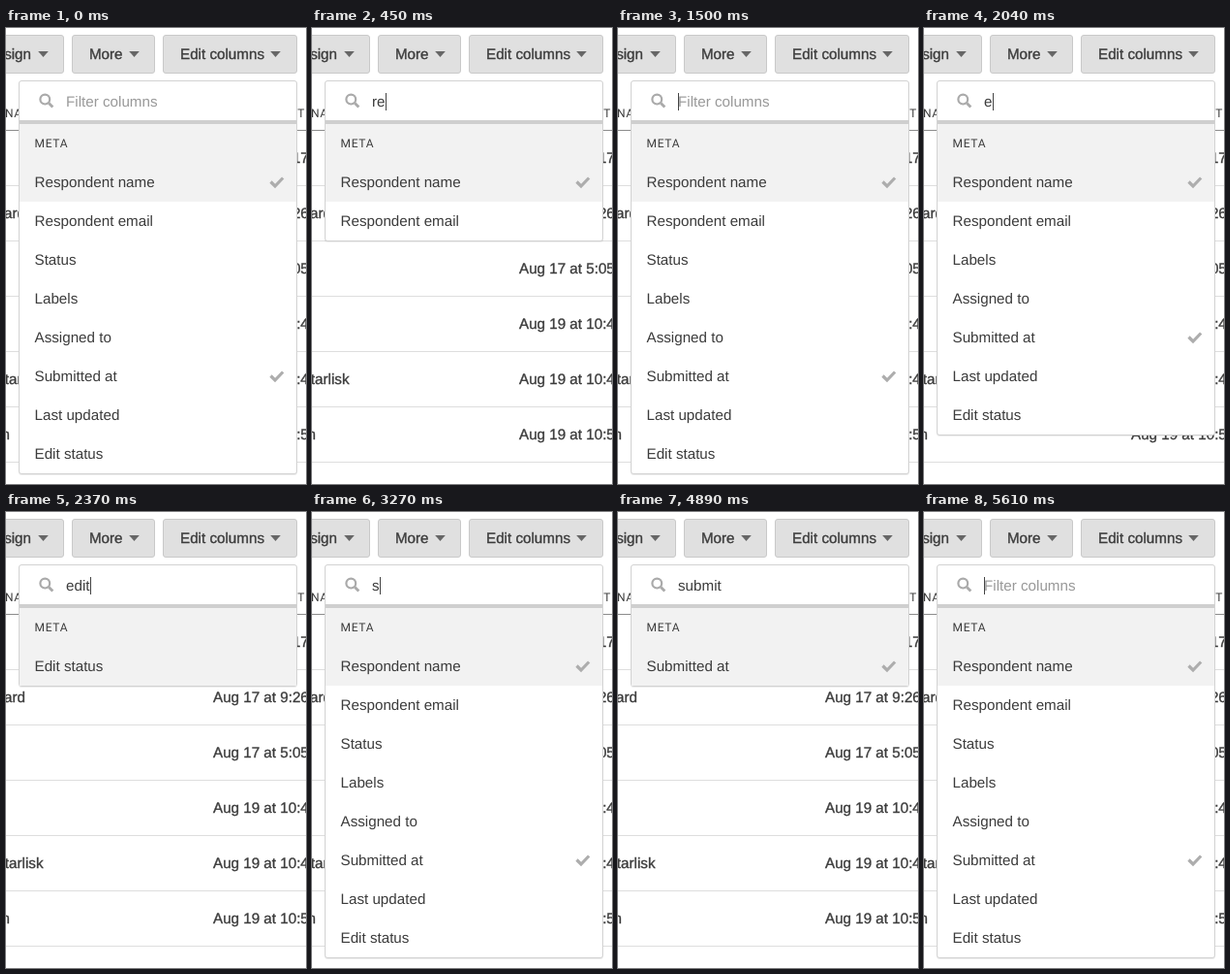
An HTML page for the animation above (5880 ms loop, 310 by 470 pixels).

```html
<!DOCTYPE html>
<html lang="en">
<head>
<meta charset="utf-8">
<title>Filter columns</title>
<style>
html, body { margin: 0; height: 100%; overflow: hidden; background: #fff; }
svg { display: block; }
text {
  font: 15.2px "Liberation Sans", Arial, sans-serif;
  fill: #3c3c3c;
  text-rendering: geometricPrecision;
  white-space: pre;
}
.strong { stroke: #3c3c3c; stroke-width: .35px; }
.small { font: 12px Roboto, sans-serif; letter-spacing: .7px; }
.hint { fill: #999; }
.end { text-anchor: end; }
.check { fill: none; stroke: #adadad; stroke-width: 3.2; }
</style>
</head>
<body>
<svg width="310" height="470" viewBox="0 0 310 470">
  <g id="page"></g>
  <g id="panel"></g>
</svg>
<script>
const LOOP = 5880, BLINK = 465;
const columns = ["Respondent name", "Respondent email", "Status", "Labels",
  "Assigned to", "Submitted at", "Last updated", "Edit status"];
const checked = ["Respondent name", "Submitted at"];

// [time, query, whole query selected]
const edits = [
  [-BLINK, ""], [330, "r"], [450, "re"], [600, "res"], [750, "resp"], [840, "respo"], [900, "respon"],
  [1080, "respon", true], [1440, ""],
  [2040, "e"], [2190, "ed"], [2280, "edi"], [2370, "edit"], [2940, "edit", true],
  [3270, "s"], [3960, "su"], [4110, "sub"], [4230, "subm"], [4320, "submi"], [4425, "submit"],
  [5430, "submit", true], [5610, ""]
];

const page = document.getElementById("page");
const panel = document.getElementById("panel");
const rect = (x, y, w, h, fill, more = "") =>
  `<rect x="${x}" y="${y}" width="${w}" height="${h}" fill="${fill}" ${more}/>`;
const text = (x, y, string, style = "") => `<text x="${x}" y="${y}" class="${style}">${string}</text>`;

function button(x, width, label, labelEnd, arrow) {
  return rect(x + .5, 7.5, width - 1, 39, "#e0e0e0", 'rx="2.5" stroke="#c9c9c9"') +
    text(labelEnd, 32, label, "strong end") +
    `<path d="M${arrow} 24h10.600l-5.300 6z" fill="#666"/>`;
}

function drawPage() {
  const rows = [["", "17 at 9:17"], ["Hallard", "17 at 9:26"], ["", "17 at 5:05"], ["", "19 at 10:41"],
    ["tarlisk", "19 at 10:47"], ["n", "19 at 10:52"], ["", "19 at 10:58"]];
  const nameEnds = [0, 20, 0, 0, 38.5, 4, 0];
  page.innerHTML =
    button(-40, 100, "Design", 26, 33.2) +
    button(68, 86, "More", 120.5, 127.2) +
    button(162, 139, "Edit columns", 267, 273.2) +
    text(-1, 92, "NAME", "small") + text(309, 92, "SUBMITTED AT", "small end") +
    rect(0, 105, 310, 1, "#8c8c8c") +
    rows.map(([name, date], i) => {
      const y = 139 + 57 * i;
      return text(nameEnds[i], y, name, "strong end") + text(214, y, "Aug " + date, "strong") +
        rect(0, y + 23, 310, 1, "#dedede");
    }).join("");
}

function drawPanel(query, selected, caretOn) {
  const shown = columns.filter(name => name.toLowerCase().includes(query));
  const height = 85 + 40 * shown.length;
  panel.innerHTML =
    rect(13, 55, 288, height + 1, "#000", 'rx="3" opacity=".07"') +
    rect(13.5, 54.5, 287, height, "#fff", 'rx="2.5" stroke="#d2d2d2"') +
    rect(14, 95, 286, 4, "#cfcfcf") + rect(14, 99, 286, 80, "#f2f2f2") +
    '<path d="M44.300 77.500l4 4" stroke="#aaa" stroke-width="2.800"/>' +
    '<circle cx="40.300" cy="73.600" r="4.900" fill="none" stroke="#aaa" stroke-width="2.200"/>' +
    rect(61.5, 66, 0, 20.5, "#add3fc", 'id="mark"') +
    text(62, 81, query || "Filter columns", query ? "" : "hint") +
    text(29.5, 123, "META", "small") +
    shown.map((name, i) => {
      const y = 164 + 40 * i;
      return text(29.5, y, name) +
        (checked.includes(name) ? `<path class="check" d="M273.500 ${y - 5.5}l4.500 4.500 8.200-8.500"/>` : "");
    }).join("");
  const width = query ? panel.querySelector("text").getComputedTextLength() : 0;
  if (selected) panel.querySelector("#mark").setAttribute("width", width + .5);
  else if (caretOn) panel.insertAdjacentHTML("beforeend", rect(Math.ceil(62 + width), 67, 1, 18, "#444"));
}

let lastState;
function frame(now) {
  const t = now % LOOP;
  const [start, query, selected] = edits.findLast(edit => edit[0] <= t);
  const caretOn = (t - start) % (2 * BLINK) < BLINK;
  const state = [query, selected, caretOn].join();
  if (state !== lastState) drawPanel(query, selected, caretOn);
  lastState = state;
  requestAnimationFrame(frame);
}

drawPage();
frame(0);
</script>
</body>
</html>
```
